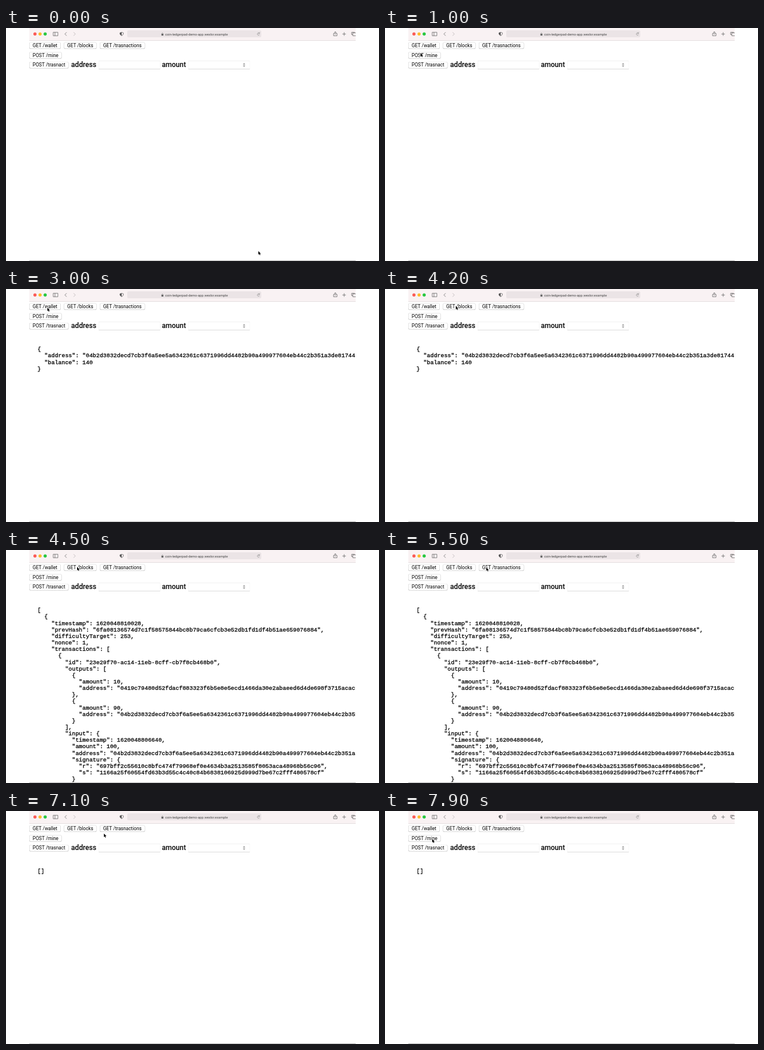
Write an HTML page with a canvas that moves like this. It is 640 px wide and 400 px high and loops after 8000 ms.

```html
<!DOCTYPE html>
<html lang="en">
<head>
<meta charset="utf-8">
<title>Blockchain test page</title>
<style>
html, body { margin: 0; overflow: hidden; background: #fff; }
canvas { display: block; }
</style>
</head>
<body>
<canvas id="stage" width="640" height="400"></canvas>
<script>
const ctx = document.getElementById('stage').getContext('2d');
const LOOP = 8000, STEP = 100;
const LEFT = 40, WIDTH = 560, BAR = 21, ROW = 16.7;
const BUTTON_FONT = '8.2px Roboto, sans-serif';
const LABEL_FONT = '500 12.1px Roboto, sans-serif';
const URL_FONT = '5.8px Roboto, sans-serif';
const CODE_FONT = '9.88px "Liberation Mono", monospace';

const wallet = '04b2d3832decd7cb3f6a5ee5a6342361c6371996dd4482b90a499977604eb44c2b351a3de81744';
const blocks = [{
  timestamp: 1620048810028,
  prevHash: '6fa08136574d7c1f58575844bc8b79ca6cfcb3e52db1fd1df4b51ae659076884',
  difficultyTarget: 253,
  nonce: 1,
  transactions: [{
    id: '23e29f70-ac14-11eb-8cff-cb7f8cb468b0',
    outputs: [
      { amount: 10, address: '0419c79480d52fdacf883323f6b5e8e5ecd1466da30e2abaeed6d4de698f3715acac' },
      { amount: 90, address: wallet }
    ],
    input: {
      timestamp: 1620048806640,
      amount: 100,
      address: wallet,
      signature: {
        r: '697bff2c55610c8bfc474f79968ef0e4634b3a2513585f8053aca48968b56c96',
        s: '1166a25f60554fd63b3d55c4c40c84b6838106925d999d7be67c2fff480578cf'
      }
    }
  }]
}];

const responses = [
  { time: 2300, body: { address: wallet, balance: 140 } },
  { time: 4500, body: blocks },
  { time: 6300, body: [] }
];

const start = { x: 433, y: 383 };
const moves = [
  { from: 0, to: 400, x: 162, y: 143 },
  { from: 600, to: 1000, x: 61, y: 43 },
  { from: 1000, to: 2100, x: 71, y: 32 },
  { from: 3300, to: 4300, x: 122, y: 29 },
  { from: 4900, to: 6100, x: 191, y: 30 },
  { from: 7000, to: 7900, x: 81, y: 48, sag: 8 }
];

const easeOut = k => 1 - (1 - k) ** 2;

function pointerAt(t) {
  let { x, y } = start;
  for (const move of moves) {
    if (t <= move.from) break;
    const k = easeOut(Math.min(1, (t - move.from) / (move.to - move.from)));
    x += (move.x - x) * k;
    y += (move.y - y) * k + (move.sag || 0) * Math.sin(Math.PI * k);
  }
  return { x, y };
}

function rect(x, y, w, h, color) {
  ctx.fillStyle = color;
  ctx.fillRect(x, y, w, h);
}

function round(x, y, w, h, r, color) {
  ctx.fillStyle = color;
  ctx.beginPath();
  ctx.roundRect(x, y, w, h, r);
  ctx.fill();
}

// Draws a string and returns its width.
function text(str, x, y, font, color = '#000') {
  ctx.font = font;
  ctx.fillStyle = color;
  ctx.fillText(str, x, y);
  return ctx.measureText(str).width;
}

function shape(x, y, d, { stroke, fill, width = 0.8 }) {
  const path = new Path2D(d);
  ctx.save();
  ctx.translate(x, y);
  ctx.lineWidth = width;
  if (stroke) { ctx.strokeStyle = stroke; ctx.stroke(path); }
  if (fill) { ctx.fillStyle = fill; ctx.fill(path); }
  ctx.restore();
}

function toolbar() {
  rect(LEFT, 0, WIDTH, BAR, '#f9f2f3');
  rect(LEFT, BAR, WIDTH, 1, '#e4dedf');
  ['#fc5b57', '#fdbc2e', '#28c840'].forEach((color, i) =>
    round(47 + 8.75 * i, 7.6, 5.4, 5.4, 2.7, color));

  round(208, 4, 230, 12, 2.5, '#ebe4e6');
  text('coin-ledgerpad-demo-app.wexlor.example', 273, 12.5, URL_FONT, '#444');

  const mid = 10.3, line = { stroke: '#666' };
  shape(85, mid, 'M-4-3h8v6h-8zM-1-3v6', line);
  shape(102, mid, 'M2-3l-3 3 3 3', line);
  shape(117, mid, 'M-1-3l3 3-3 3', { stroke: '#b5b0b1' });
  shape(198.5, mid, 'M0-3l3 1v2q-1 2-3 3-2-1-3-3v-2z', line);
  shape(198.5, mid, 'M0-3v6q-2-1-3-3v-2z', { fill: '#555' });
  shape(268.4, mid, 'M-1 0v-1q1-2 2 0v1', { stroke: '#666', width: 0.6 });
  rect(266.7, 10, 3.4, 3, '#666');
  shape(433, mid, 'M2-1a2 2 0 1 0 0 2M2-3v2h-2', { stroke: '#777', width: 0.6 });
  shape(565, mid, 'M-1-1h-2v4h6v-4h-2M0 1v-5M-2-2l2-2 2 2', line);
  shape(580.2, mid, 'M-3 0h6M0-3v6', line);
  shape(597, mid, 'M-2-2h6v5h-6zM-2 1h-2v-4h5v1', line);
}

// Buttons and fields flow from left to right; each returns where it ends.
function button(label, x, y) {
  ctx.font = BUTTON_FONT;
  const w = ctx.measureText(label).width + 11.6;
  round(x, y, w, 11.6, 2.6, '#c9c9c9');
  round(x + 0.5, y + 0.3, w - 1, 10.5, 2.3, '#fff');
  text(label, x + 5.8, y + 8.5, BUTTON_FONT);
  return x + w;
}

function field(label, x, y) {
  const left = x + text(label, x, y + 10.6, LABEL_FONT) + 4, w = 105.5;
  rect(left, y, w, 14, '#f0f0f0');
  rect(left + 0.5, y + 1, w - 1, 13, '#fff');
  rect(left, y + 14, w, 1, '#dcdcdc');
  return left + w;
}

function controls() {
  const rows = [['GET /wallet', 'GET /blocks', 'GET /trasnactions'], ['POST /mine'], ['POST /trasnact']];
  let x;
  rows.forEach((labels, row) => {
    x = LEFT;
    for (const label of labels) x = button(label, x, 24.5 + ROW * row) + 5.5;
  });
  for (const label of ['address', 'amount']) x = field(label, x - 1.2, 56) + 4;
  shape(408.5, 63.5, 'M-2-1l2-2 2 2zM-2 1l2 2 2-2z', { fill: '#777' });
}

function response(t) {
  const shown = responses.filter(r => r.time <= t).pop();
  if (!shown) return;
  ctx.strokeStyle = '#000';
  ctx.lineWidth = 0.3;
  JSON.stringify(shown.body, null, 2).split('\n').forEach((line, i) => {
    const y = 106.3 + i * 11.15;
    text(line, 54, y, CODE_FONT);
    ctx.strokeText(line, 54, y);
  });
}

function pointer({ x, y }) {
  const arrow = 'M0 0v6l1.4-1.2 1 2.3 1.1-.5-1-2.2h1.9z';
  shape(x, y, arrow, { stroke: '#fff', fill: '#000', width: 1.2 });
}

function draw(t) {
  rect(0, 0, 640, 400, '#fff');
  ctx.save();
  ctx.beginPath();
  ctx.rect(LEFT, 0, WIDTH, 400);
  ctx.clip();
  toolbar();
  controls();
  response(t);
  rect(LEFT, 399, WIDTH, 1, '#b8b8b8');
  pointer(pointerAt(t));
  ctx.restore();
}

function tick() {
  const t = performance.now() % LOOP;
  draw(Math.floor(t / STEP) * STEP);
  requestAnimationFrame(tick);
}
tick();
</script>
</body>
</html>
```
